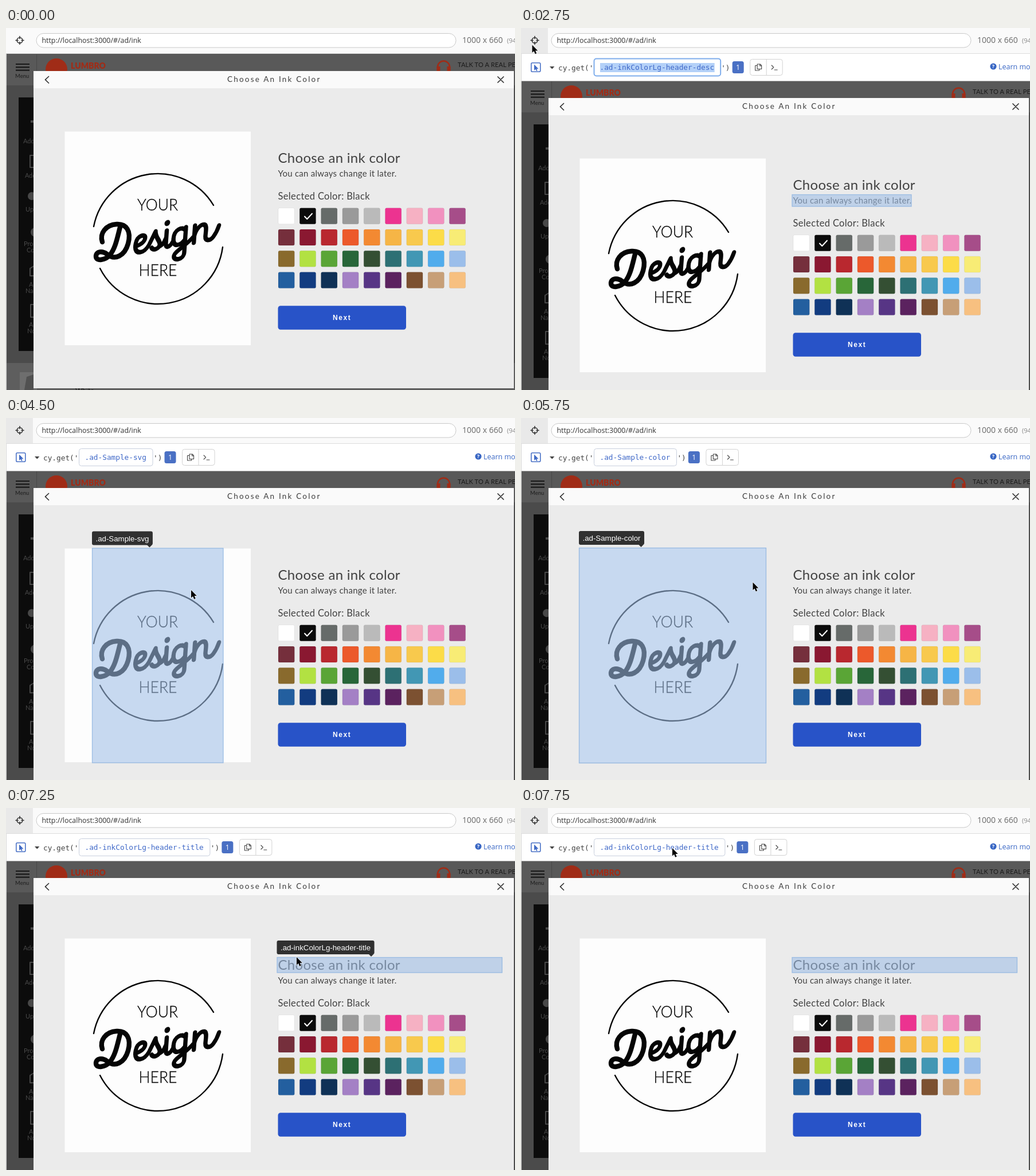
An HTML page that plays this animation: 888x631 px, repeating every 8000 ms.

```html
<!DOCTYPE html>
<html lang="en">
<head>
<meta charset="utf-8">
<title>Selector playground</title>
<style>
html, body { margin: 0; width: 100%; height: 100%; overflow: hidden; background: #4a4a4a; }
svg { display: block; width: 888px; height: 631px; }
text { font-family: Lato, sans-serif; white-space: pre; }
.ui { font-family: "Open Sans", sans-serif; }
.code { font-family: "DejaVu Sans Mono", monospace; font-size: 12.75px; }
.arial { font-family: "Liberation Sans", sans-serif; }
.line { fill: none; stroke-linecap: round; stroke-linejoin: round; }
</style>
</head>
<body>
<svg viewBox="0 0 888 631">
  <g id="page">
    <rect y="45" width="888" height="640" fill="#4b4b4b"/>
    <rect y="45" width="888" height="55" fill="#595959"/>
    <rect y="584" width="888" height="100" fill="#5e5e5e"/>
    <path d="M53.5 46V100" stroke="#484848"/>
    <path d="M17 63H41M17 68.3H41M17 73.6H41" stroke="#181818" stroke-width="2.2"/>
    <text x="16" y="87" font-size="9.5" fill="#1d1d1d">Menu</text>
    <circle cx="88" cy="72" r="19" fill="#a02c17"/>
    <text x="113" y="71" font-size="14" font-weight="900" fill="#a02c17">LUMBRO</text>
    <path class="line" d="M753 74V68A10.5 10.5 0 0 1 774 68V74" stroke="#a02c17" stroke-width="2.5"/>
    <path d="M754.5 67V78M772.5 67V78" stroke="#a02c17" stroke-width="6"/>
    <text x="788" y="67.5" font-size="11" letter-spacing=".2" fill="#1a1a1a">TALK TO A REAL PERSON</text>
    <rect x="22" y="121" width="40" height="442" fill="#0c0c0c"/>
    <g id="sidebar" fill="#484848" font-size="11"></g>
    <rect x="24" y="600" width="30" height="80" fill="#6e6e6e"/>
    <path d="M32 631L36 608L48 604V631Z" fill="#515151"/>
    <text x="121" y="636" font-size="12" fill="#222">White</text>

    <rect x="48" y="75" width="838" height="553" fill="#ebebeb"/>
    <rect x="48" y="75" width="838" height="30" fill="#fafafa"/>
    <path class="line" d="M74.5 84.5L68.5 90.2L74.5 96M858 85L868 95M868 85L858 95" stroke="#333" stroke-width="1.7"/>
    <text x="386" y="94" font-size="13.5" letter-spacing="2.2" fill="#3d3d3d">Choose An Ink Color</text>

    <rect x="102.5" y="180.5" width="324.5" height="372.5" fill="#fdfdfd"/>
    <g stroke="#050505" class="line">
      <path stroke-width="2.4" d="M153 346A113.7 113.7 0 0 1 362 309M378 382A113.7 113.7 0 0 1 164 419"/>
      <path stroke-width="8.4" d="M199 347C194 366 191 384 181 396C174 404 157 408 157 398C157 389 168 388 176 394C190 406 207 397 213 376C219 354 210 341 193 342C174 343 163 358 168 373"/>
      <g transform="translate(222 397) rotate(-10) skewX(-14)" stroke-width="7.6">
        <path d="M3 -16C13 -16 20 -22 19 -28C18 -34 5 -34 3 -21C1 -8 7 -4 13 -4C20 -4 24 -9 27 -14L37 -35C37 -24 47 -18 46 -11C45 -3 35 -3 32 -8M45 -8C52 -9 54 -15 56 -20"/>
        <path d="M57 -33V-11C57 -3 64 -3 69 -12"/>
        <path d="M57 -46V-45.9" stroke-width="10"/>
        <path d="M91 -28C84 -36 70 -33 70 -17C70 -2 83 -2 91 -13M91 -33V10C91 22 73 22 73 13C73 5 92 0 105 -14"/>
        <path d="M107 -33V-4M107 -15C109 -26 117 -34 123 -32C129 -30 127 -20 127 -12C127 -2 137 -3 141 -8C145 -13 148 -19 150 -26"/>
      </g>
    </g>
    <g font-size="26.5" font-weight="300" text-anchor="middle" fill="#050505" stroke="#050505" stroke-width=".3">
      <text x="264.5" y="317.5">YOUR</text>
      <text x="265" y="432">HERE</text>
    </g>

    <g fill="#414141">
      <text x="474.5" y="234.5" font-size="24" letter-spacing=".3">Choose an ink color</text>
      <text x="474.5" y="259" font-size="15" letter-spacing=".25">You can always change it later.</text>
      <text x="474.5" y="298.6" font-size="16.5" letter-spacing=".36">Selected Color: Black</text>
    </g>
    <g id="swatches"></g>
    <path class="line" d="M521 328.5L525.3 333L534 323.5" stroke="#fff" stroke-width="2"/>
    <rect x="474.5" y="484.3" width="223.5" height="41.5" rx="4.5" fill="#2853c8"/>
    <text class="arial" x="570" y="508.5" font-size="12" font-weight="700" letter-spacing="1.6" fill="#fff">Next</text>
  </g>

  <rect id="highlight" fill="#9fbfe6" fill-opacity=".57" stroke="#8db5e2" stroke-opacity=".8" stroke-width="1.3"/>
  <g id="tip">
    <rect height="24" rx="3" fill="#303030"/>
    <path fill="#303030"/>
    <text class="arial" x="6.5" y="17" font-size="13.27" fill="#fff"></text>
  </g>

  <rect width="888" height="45" fill="#fafafa"/>
  <rect id="target" width="47" height="44"/>
  <path d="M0 44.5H888" stroke="#dcdcdc"/>
  <g class="line" stroke="#333" stroke-width="1.6">
    <circle cx="24" cy="21.5" r="4.8"/>
    <path d="M24 14.5V18.5M24 24.5V28.5M17 21.5H21M27 21.5H31"/>
  </g>
  <rect x="53" y="9.5" width="732" height="24.5" rx="12.2" fill="#fff" stroke="#c9c9c9"/>
  <text class="ui" x="62.5" y="26" font-size="12.4" fill="#333">http://localhost:3000/#/ad/ink</text>
  <text class="ui" x="796" y="26" font-size="14" fill="#6a6a6a">1000 x 660</text>
  <text class="ui" x="874" y="25.5" font-size="11" fill="#888">(94%)</text>

  <g id="bar">
    <rect y="45" width="888" height="47.5" fill="#fff"/>
    <rect x="17.8" y="60.8" width="16" height="15.4" rx="2" fill="#fff" stroke="#4a72c6" stroke-width="1.6"/>
    <path d="M23 63.5V74L25.4 71.8L27 75L28.6 74.2L27.2 71.2H30.5Z" fill="#3f69c4"/>
    <path d="M50 67H58.4L54.2 71.6Z" fill="#444"/>
    <text class="code" x="65" y="73.5" fill="#444">cy.get('</text>
    <rect id="field" x="127.5" y="53.5" height="30" rx="4" fill="#fff"/>
    <rect id="selection" x="138" y="61" height="16" fill="#b4d1f8"/>
    <text class="code" id="selector" x="137.5" y="73" fill="#3f68c8"></text>
    <g id="after">
      <text class="code" x="1" y="73.5" fill="#444">')</text>
      <rect x="20.5" y="58" width="20" height="21" rx="3.5" fill="#4a70c4"/>
      <text class="ui" x="30.5" y="73" font-size="12.5" text-anchor="middle" fill="#fff">1</text>
      <rect x="51.5" y="54.5" width="56.5" height="28" rx="4" fill="#fff" stroke="#d2d2d2"/>
      <path d="M80 54.5V82.5" stroke="#d2d2d2"/>
      <g class="line" stroke="#444" stroke-width="1.1">
        <path d="M64 65.5H60.5V74H67.5V71.5M64 63H69L71.5 65.5V71.5H64ZM68.5 63V66H71.5"/>
        <path d="M89 65L92.5 68.5L89 72M94 73H99"/>
      </g>
    </g>
    <circle cx="824" cy="67" r="5.6" fill="#3866c4"/>
    <text class="ui" x="824" y="70.4" font-size="9" font-weight="700" text-anchor="middle" fill="#fff">?</text>
    <text class="ui" x="833" y="71.5" font-size="12.5" fill="#3866c4">Learn more</text>
  </g>

  <g id="hint">
    <path d="M-20 49.5H100a4 4 0 0 1 4 4V70a4 4 0 0 1-4 4H-20ZM17 50L22.5 45L28 50Z" fill="#1c1c1c"/>
    <text class="ui" x="97" y="66" font-size="12" text-anchor="end" fill="#fff">Open Selector Playground</text>
  </g>
  <rect y="45" width="1" height="586" fill="#d8d8d8"/>
  <path id="cursor" d="M0 0V13.6L3.1 10.8L5.2 15.8L7.7 14.7L5.6 9.9H9.8Z" fill="#000" stroke="#fff" stroke-width="1.1" paint-order="stroke"/>
</svg>
<script>
const LOOP = 8000, CHAR = 7.68, SHIFT = 47;
const $ = id => document.getElementById(id);
const set = (el, attrs) => { for (const k in attrs) el.setAttribute(k, attrs[k]); };
const show = (el, on) => el.style.display = on ? '' : 'none';

const inks = [
  'ffffff 0b0b0b 666b69 9a9a9a bababa ec3390 f6b1c3 f191bf a64d89',
  '752f3c 8a1831 b9282f ec592b f38932 f6b546 f8c94d fcdc48 f8ec75',
  '896a2d b2e142 5aa536 286639 344f33 2d7074 4297b4 51acec 9bbeea',
  '235f9f 123c80 0f3156 a480c5 573585 5b225f 7c5131 c79f77 f7c080'
];
$('swatches').innerHTML = inks.map((row, j) => row.split(' ').map((ink, i) =>
  `<rect x="${475 + 37.3 * i}" y="${313.7 + 37.3 * j}" width="28.3" height="28" rx="2.5"
    fill="#${ink}" stroke="#000" stroke-opacity=".08" stroke-width=".8"/>`).join('')).join('');

const labels = [[30, 201, 'Add'], [33, 261, 'Add'], [34, 320, 'Upload'], [31, 380, 'Product'],
  [36, 391, 'Colors'], [40, 451, 'Add'], [34, 462, 'Names'], [40, 521, 'Add'], [37, 532, 'Notes']];
$('sidebar').innerHTML = labels.map(([x, y, s]) => `<text x="${x}" y="${y}">${s}</text>`).join('') +
  `<path d="M43 161H60V165H43Z"/><circle cx="45" cy="293" r="7"/><circle cx="51" cy="356" r="8"/>
   <path class="line" stroke="#484848" stroke-width="2" d="M50 222H42V243H50M50 414L42 419V432H50M50 482H43V504H50"/>`;

const areas = {
  desc: { x: 473, y: 290.5, w: 208, h: 20.5, name: '.ad-inkColorLg-header-desc' },
  sample: { x: 101.5, y: 166, w: 327, h: 500, name: '.ad-Sample' },
  svg: { x: 150.5, y: 227, w: 228.5, h: 374, name: '.ad-Sample-svg' },
  color: { x: 101.5, y: 226.5, w: 326, h: 375, name: '.ad-Sample-color' },
  title: { x: 473, y: 260.5, w: 392.5, h: 26.5, name: '.ad-inkColorLg-header-title' }
};

// Each step overrides only what changes at that time.
const steps = [
  [0, { cursor: null, button: '#fafafa', hint: false, field: null, focus: false, area: null, tip: false }],
  [750, { cursor: [34, -5] }],
  [1000, { cursor: [15, 27] }],
  [1250, { cursor: [19.5, 23.5] }],
  [1750, { button: '#efefef', hint: true }],
  [2000, { cursor: [19.5, 29.5] }],
  [2500, { button: '#e9e9e9' }],
  [2750, { hint: false, field: 'desc', focus: true, area: 'desc' }],
  [3500, { cursor: [350, 223], area: 'sample', tip: true }],
  [3750, { cursor: [346, 221] }],
  [4000, { cursor: [333, 281.5], area: 'svg' }],
  [4250, { cursor: [323, 300] }],
  [4500, { field: 'svg', focus: false }],
  [5000, { cursor: [163.5, 207.5] }],
  [5250, { cursor: [133, 207.5], area: 'color' }],
  [5500, { cursor: [404.5, 286.5] }],
  [5750, { field: 'color' }],
  [6250, { cursor: [496, 242.5], area: 'title' }],
  [6500, { cursor: [534, 278] }],
  [7000, { field: 'title' }],
  [7250, { cursor: [507, 260] }],
  [7500, { cursor: [300, 100], tip: false }],
  [7750, { cursor: [264, 70] }]
];

function drawTip({ x, y, name }) {
  const [box, arrow, label] = $('tip').children;
  label.textContent = name;
  const width = label.getComputedTextLength() + 13;
  set(box, { width });
  set(arrow, { d: `M${width - 10} 23.5h9l-4.5 4.5z` });
  set($('tip'), { transform: `translate(${x - .5} ${y - 29.5})` });
}

function drawBar(name, focus) {
  const textWidth = name.length * CHAR, right = 148.5 + textWidth;
  $('selector').textContent = name;
  set($('field'), { width: right - 127.5, stroke: focus ? '#7fadec' : '#c8cfdd', 'stroke-width': focus ? 2 : 1 });
  set($('selection'), { width: textWidth });
  show($('selection'), focus);
  set($('after'), { transform: `translate(${right} 0)` });
}

function draw(state) {
  const { cursor, button, hint, field, focus, area, tip } = state;
  show($('cursor'), cursor);
  if (cursor) set($('cursor'), { transform: `translate(${cursor})` });
  set($('target'), { fill: button });
  show($('hint'), hint);
  show($('bar'), field);
  set($('page'), { transform: `translate(0 ${field ? SHIFT : 0})` });
  if (field) drawBar(areas[field].name, focus);
  show($('highlight'), area);
  show($('tip'), tip);
  if (area) {
    const { x, y, w, h } = areas[area];
    set($('highlight'), { x, y, width: w, height: h });
  }
  if (tip) drawTip(areas[area]);
}

const start = performance.now();
let current = -1;
function frame() {
  const t = Math.max(0, performance.now() - start) % LOOP;
  const index = steps.findLastIndex(([at]) => at <= t);
  if (index !== current) {
    current = index;
    draw(Object.assign({}, ...steps.slice(0, index + 1).map(step => step[1])));
  }
  requestAnimationFrame(frame);
}
frame();
</script>
</body>
</html>
```
